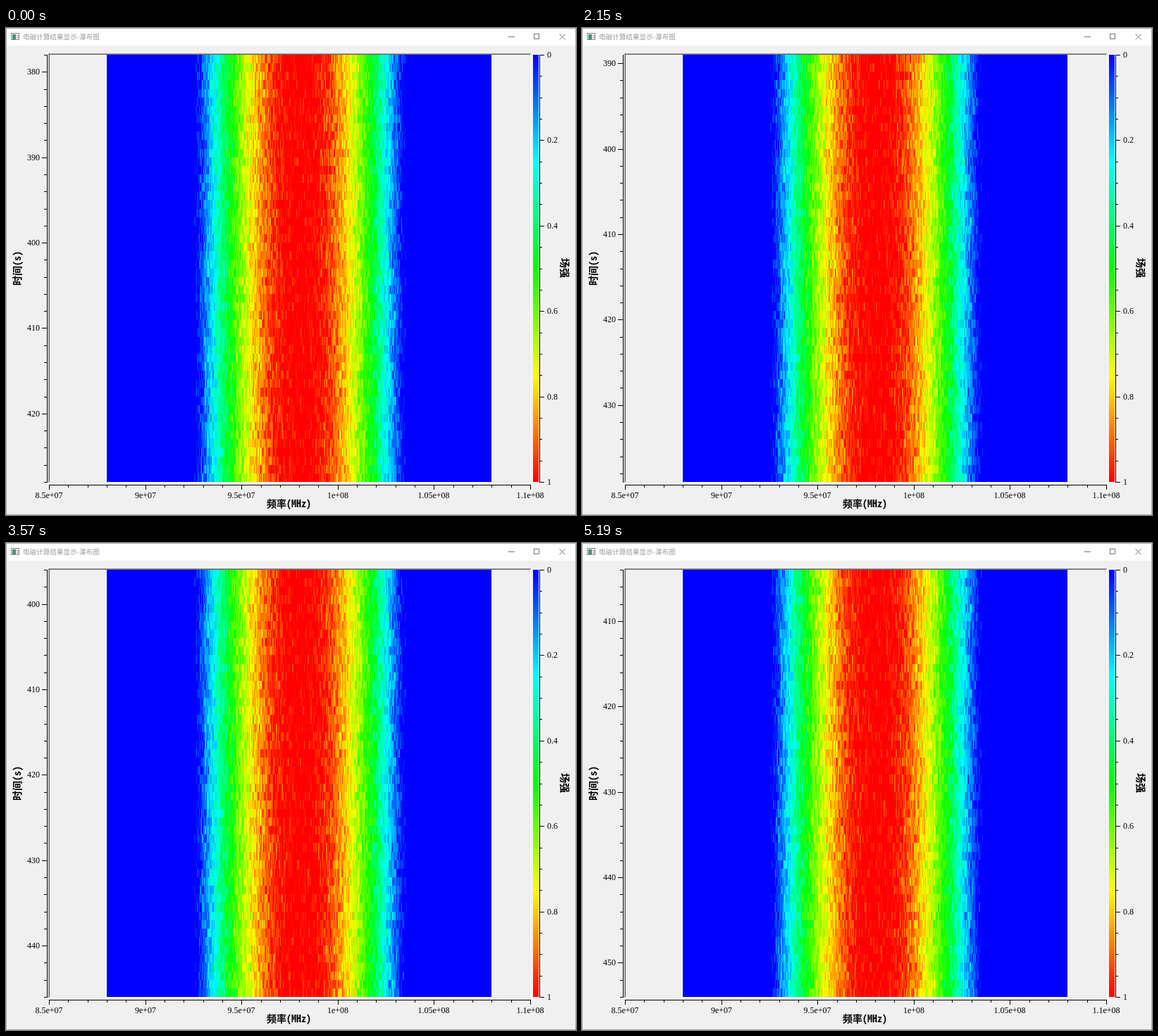
These frames come from a looping animation (809 px wide and 692 px high, 5.28 s). An HTML page with a canvas:

```html
<!DOCTYPE html>
<html lang="zh">
<head>
<meta charset="utf-8">
<title>瀑布图</title>
<style>
  html, body { margin: 0; width: 100%; height: 100%; overflow: hidden; background: #f0f0f0; }
  svg, canvas { position: absolute; left: 0; top: 0; display: block; }
  .num { font: 12px "Liberation Serif", "Times New Roman", serif; }
  .label { font: bold 14px "Noto Sans Mono CJK SC", "Noto Sans CJK SC", "Noto Sans CJK", monospace; text-anchor: middle; }
  .title { font: 9.6px "Noto Sans CJK SC", "Noto Sans CJK", sans-serif; fill: #999; }
</style>
</head>
<body>
<svg id="stage" width="809" height="692" viewBox="0 0 809 692">
  <defs>
    <linearGradient id="scale" x1="0" y1="0" x2="0" y2="1">
      <stop offset="0" stop-color="#00f"/>
      <stop offset=".25" stop-color="#0ff"/>
      <stop offset=".5" stop-color="#0f0"/>
      <stop offset=".75" stop-color="#ff0"/>
      <stop offset="1" stop-color="#f00"/>
    </linearGradient>
  </defs>
  <rect x=".5" y=".5" width="808" height="691" fill="#f0f0f0" stroke="#aaa"/>
  <rect x="1" y="1" width="807" height="24" fill="#fff"/>

  <g shape-rendering="crispEdges">
    <rect x="7.5" y="7.5" width="11" height="9" fill="#f4f4f4" stroke="#888"/>
    <rect x="9" y="9" width="5" height="7" fill="#4a8f84"/>
    <rect x="15" y="10" width="3" height="5" fill="#ccc"/>
  </g>
  <text class="title" x="24" y="16">电磁计算结果显示-瀑布图</text>
  <g fill="none" stroke="#777">
    <path d="M713 12.5h9M749.5 8.5h7v7h-7z" shape-rendering="crispEdges"/>
    <path d="M785.5 8.5l8 8m0-8l-8 8"/>
  </g>

  <!-- sunken plot frame and colour bar -->
  <g fill="none" shape-rendering="crispEdges">
    <path d="M60.5 646V36.5H745" stroke="#a0a0a0"/>
    <path d="M61.5 645V37.5H744" stroke="#696969"/>
    <path d="M62 645.5H743.5V38" stroke="#e3e3e3"/>
    <path d="M61 646.5H744.5V37" stroke="#fff"/>
    <rect x="748" y="38" width="8" height="607" fill="url(#scale)"/>
  </g>
  <g id="axes"></g>
  <g id="timeAxis"></g>

  <text class="label" x="401.5" y="681">频率(MHz)</text>
  <text class="label" transform="translate(21 341.5) rotate(-90)">时间(s)</text>
  <text class="label" transform="translate(788 341) rotate(90)">场强</text>
</svg>
<canvas id="heat" width="809" height="692"></canvas>

<script>
const LOOP = 5280;
const FIRST_SECOND = 378;
const STEPS = [130, 300, 530, 760, 910, 1140, 1290, 1520, 1770, 1920, 2150, 2320, 2540,
  2770, 2940, 3190, 3320, 3570, 3700, 3950, 4180, 4330, 4580, 4810, 4960, 5190];

const TOP = 38, BOTTOM = 645, ROWS = 50;
const ROW_H = (BOTTOM - TOP) / ROWS;
const HEAT_LEFT = 143, HEAT_RIGHT = 689, COLUMNS = 400;
const COL_W = (HEAT_RIGHT - HEAT_LEFT) / COLUMNS;
const PEAK_X = 417.5, HALF_WIDTH = 145, GAIN = 1.04, NOISE = .12;

const ctx = document.getElementById("heat").getContext("2d");
const axes = document.getElementById("axes");
const timeAxis = document.getElementById("timeAxis");

const line = d => `<path d="${d}" fill="none" stroke="#000" shape-rendering="crispEdges"/>`;
const number = (x, y, text, anchor) =>
  `<text class="num" x="${x}" y="${y}" text-anchor="${anchor}">${text}</text>`;

// Repeatable random value in 0..1 for a cell
function random(a, b) {
  let h = Math.imul(a, 374761393) ^ Math.imul(b, 668265263);
  h = Math.imul(h ^ (h >>> 15), 2246822519);
  h = Math.imul(h ^ (h >>> 13), 3266489917);
  return ((h ^ (h >>> 16)) >>> 0) / 4294967296;
}

function strength(second, column) {
  const distance = Math.abs(HEAT_LEFT + (column + .5) * COL_W - PEAK_X);
  if (distance > HALF_WIDTH * 1.04) return 0;
  const noise = (random(second, column) + random(second, column + 1000) - 1) * NOISE;
  const mean = GAIN * Math.cos(distance / HALF_WIDTH * Math.PI / 2);
  return Math.min(1, Math.max(0, mean + noise));
}

function color(value) {
  const ramp = v => Math.round(255 * Math.min(1, Math.max(0, v)));
  const red = ramp(4 * value - 2);
  const green = ramp(Math.min(4 * value, 4 - 4 * value));
  const blue = ramp(2 - 4 * value);
  return `rgb(${red},${green},${blue})`;
}

function drawFixedAxes() {
  let ticks = "M61 649.5H745", out = "";
  for (let i = 0; i <= 25; i++) {
    const x = Math.round(61 + i * 27.32);
    ticks += `M${x + .5} 649v${i % 5 ? 4 : 7}`;
    if (i % 5 === 0) {
      const text = ((85 + i) * 1e6).toExponential().replace("+", "+0");
      out += number(x, 668, text, "middle");
    }
  }
  ticks += `M757.5 ${TOP}V${BOTTOM + 1}`;
  for (let i = 0; i <= 20; i++) {
    const y = Math.round(TOP + i * (BOTTOM - TOP) / 20);
    ticks += `M757 ${y + .5}h${i % 4 ? 4 : 7}`;
    if (i % 4 === 0) out += number(768, y + 4, i / 20, "start");
  }
  axes.innerHTML = line(ticks) + out;
}

function drawTimeAxis(first) {
  let ticks = `M58.5 ${TOP}V${BOTTOM + 1}`, out = "";
  for (let s = first + first % 2; s <= first + ROWS; s += 2) {
    const y = Math.round(TOP + (s - first) * ROW_H);
    const major = s % 10 === 0;
    ticks += `M${major ? 51 : 54} ${y + .5}H58`;
    if (major) out += number(48, y + 4, s, "end");
  }
  timeAxis.innerHTML = line(ticks) + out;
}

function drawHeat(first) {
  ctx.clearRect(0, 0, 809, 692);
  ctx.fillStyle = "#00f";
  ctx.fillRect(HEAT_LEFT, TOP, HEAT_RIGHT - HEAT_LEFT, BOTTOM - TOP);
  for (let row = 0; row < ROWS; row++) {
    const y = Math.round(TOP + row * ROW_H);
    const end = Math.round(TOP + (row + 1) * ROW_H);
    for (let col = 0; col < COLUMNS; col++) {
      const value = strength(first + row, col);
      if (!value) continue;
      const x = Math.round(HEAT_LEFT + col * COL_W);
      const right = Math.round(HEAT_LEFT + (col + 1) * COL_W);
      ctx.fillStyle = color(value);
      ctx.fillRect(x, y, right - x, end - y);
    }
  }
}

let shown;
function render(time) {
  const first = FIRST_SECOND + STEPS.filter(step => step <= time).length;
  if (first === shown) return;
  shown = first;
  drawTimeAxis(first);
  drawHeat(first);
}

drawFixedAxes();
render(0);
const start = performance.now();
function tick() {
  render((performance.now() - start) % LOOP);
  requestAnimationFrame(tick);
}
requestAnimationFrame(tick);
</script>
</body>
</html>
```
